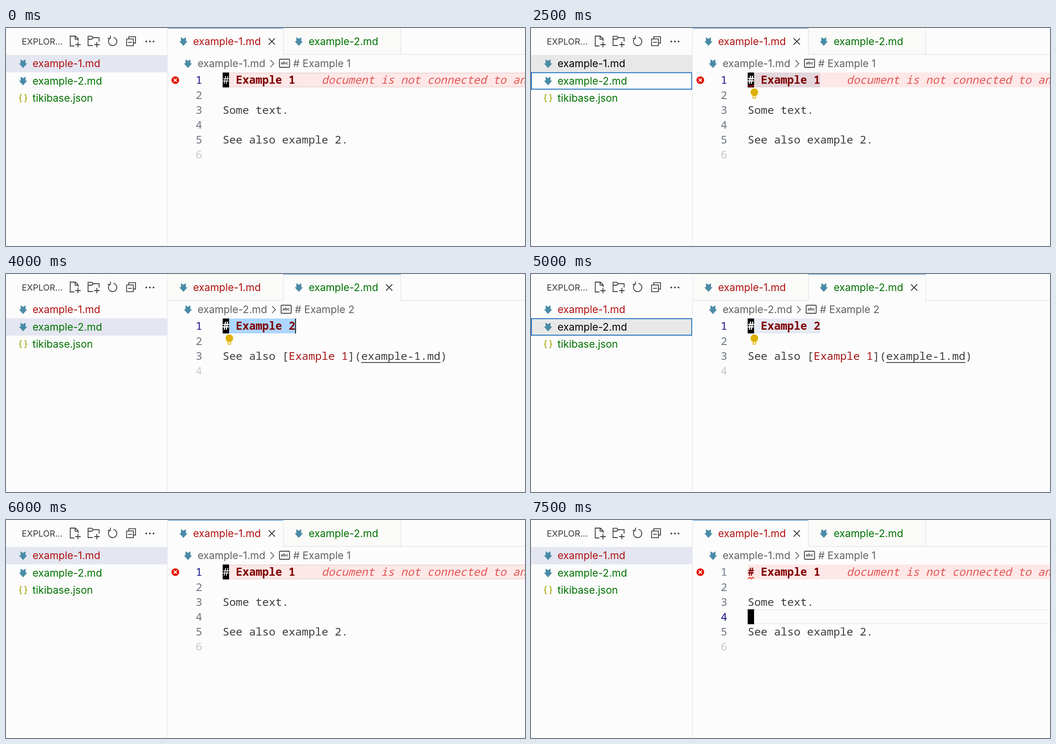
An HTML page for the animation above (8 s loop, 1154 by 485 pixels).

```html
<!DOCTYPE html>
<html lang="en">
<head>
<meta charset="utf-8">
<title>Editor walkthrough</title>
<style>
  html, body { margin: 0; width: 100%; height: 100%; overflow: hidden; background: #fcfcfc; }
  svg { display: block; width: 100%; height: 100%; }
  text { white-space: pre; }
  .ui { font: 22.75px Inter, sans-serif; }
  .code { font: 24.45px "Noto Sans Mono", monospace; }
  .bold { font-weight: 700; }
  .slant { font-style: italic; }
  .icon { fill: none; stroke: #3b3b3b; stroke-width: 1.8; }
</style>
</head>
<body>
<svg id="stage" viewBox="0 0 1154 485"></svg>
<script>
const LOOP = 8000;
const RED = '#b01011', GREEN = '#007100', INK = '#3b3b3b', HEAD = '#800000';
const LEFT = 481.8, CHAR = 14.67, TOP = 99, PITCH = 33.2;
const FILES = ['example-1.md', 'example-2.md', 'tikibase.json'];

// file: open tab; focus: sidebar row with the keyboard; select: heading selected; line: cursor line
const STEPS = [
  { at: 0, file: 0, line: 1 },
  { at: 1000, file: 0, line: 1, select: true },
  { at: 2000, file: 0, line: 1, select: true, focus: 0 },
  { at: 2500, file: 0, line: 1, select: true, focus: 1 },
  { at: 3000, file: 1, line: 1 },
  { at: 4000, file: 1, line: 1, select: true },
  { at: 5000, file: 1, line: 1, select: true, focus: 1 },
  { at: 5500, file: 1, line: 1, select: true, focus: 0 },
  { at: 6000, file: 0, line: 1 },
  { at: 6500, file: 0, line: 2 },
  { at: 7000, file: 0, line: 3 },
  { at: 7500, file: 0, line: 4 }
];

const rect = (x, y, w, h, fill, more = '') =>
  `<rect x="${x}" y="${y}" width="${w}" height="${h}" fill="${fill}" ${more}/>`;
const icon = (d, more = '') => `<path class="icon" d="${d}" ${more}/>`;
const label = (x, y, s, fill, more = '') =>
  `<text class="ui" x="${x}" y="${y}" fill="${fill}" ${more}>${s}</text>`;
const col = n => LEFT + n * CHAR;
const lineTop = n => TOP + (n - 1) * PITCH;
const baseline = n => 124.3 + (n - 1) * PITCH;
const code = (line, c, s, fill = INK, style = '') =>
  `<text class="code ${style}" x="${col(c)}" y="${baseline(line)}" fill="${fill}">${s}</text>`;
const arrow = (x, y) =>
  `<path transform="translate(${x} ${y})" fill="#498ba7"
    d="M-5.5-9.5L0-6L5.5-9.5V-.5H9.2L0 9.8L-9.2-.5H-5.5Z"/>`;

function toolbar() {
  return label(35, 36.5, 'EXPLOR...', INK, 'style="font-size:19.25px"') +
    icon('M152 40H142.8V18H154L160.6 24.5V29M153.6 18V24.8H160.6M160 31V43M154 37H166') +
    icon('M193 39H182.5V18.3H191L194 21.5H207V30M182.5 25H190.5L194 21.5M202 31V43M196 37H208') +
    icon('M226 23.2H232.2V17M231.2 22.7A9.3 9.3 0 1 0 239 20.8') +
    icon('M273 24V19.4H288V33.5H283.5M268.2 24.3H283.2V39.3H268.2ZM271.5 31.8H280') +
    [312, 320, 328].map(x => `<circle cx="${x}" cy="30" r="1.9" fill="${INK}"/>`).join('');
}

function sidebar({ file, focus }) {
  const active = focus !== undefined;
  const rowTop = i => 60 + i * 38.5;
  let out = toolbar() + rect(0, rowTop(file), 358.5, 38.5, active ? '#e8e8e8' : '#e4e6f1');
  if (active) {
    out += rect(.9, rowTop(focus) + .9, 356.5, 36.7, 'none', 'stroke="#005fb8" stroke-width="1.75"');
  }
  FILES.forEach((name, i) => {
    const colour = active && i === file ? '#000' : i ? GREEN : RED;
    out += label(59, 87.2 + i * 38.5, name, colour);
    if (i < 2) out += arrow(38, 79.2 + i * 38.5);
  });
  return out + icon('M35 148H34Q32 148 32 150.5V153.5Q32 156 29 156Q32 156 32 158.5V161.5Q32 164 34 164H35' +
    'M41 148H42Q44 148 44 150.5V153.5Q44 156 47 156Q44 156 44 158.5V161.5Q44 164 42 164H41',
    'style="stroke:#b7b73b;stroke-width:2.4"') + rect(358.3, 0, 1.2, 485, '#e5e5e5');
}

function tabs({ file }) {
  const edges = [359.5, 616.5, 877.5];
  const x0 = edges[file], x1 = edges[file + 1], other = 1 - file;
  const close = file ? 852 : 591;
  return rect(edges[other], 0, edges[other + 1] - edges[other], 59, '#fafaf8') +
    rect(359.5, 58.2, x0 - 359.5, 1.4, '#e5e5e5') +
    rect(x1, 58.2, 1154 - x1, 1.4, '#e5e5e5') +
    rect(616, 0, 1.4, 59, '#e5e5e5') + rect(877, 0, 1.4, 59, '#e5e5e5') +
    rect(x0, 0, x1 - x0, 1.3, '#5a97d0') +
    arrow(394.5, 30) + label(416, 38, FILES[0], RED) +
    arrow(651, 30) + label(673, 38, FILES[1], GREEN) +
    icon(`M${close - 7} 23L${close + 7} 37M${close + 7} 23L${close - 7} 37`);
}

function breadcrumb({ file }) {
  const dx = file * 3.7;
  return arrow(404.5, 79.2) + label(426, 87.2, FILES[file], '#616161') +
    `<g transform="translate(${dx} 0)">` +
    icon('M588 71.5L595.5 79.2L588 87', 'style="stroke:#616161"') +
    icon('M610 69.5H628.5Q630.5 69.5 630.5 71.5V85.5Q630.5 87.5 628.5 87.5H610Q608 87.5 608 85.5V71.5Q608 69.5 610 69.5Z') +
    `<text class="code bold" x="619.3" y="81.3" text-anchor="middle" fill="${INK}" style="font-size:9.5px">abc</text>` +
    label(638.5, 87.2, `# Example ${file + 1}`, '#616161') + '</g>';
}

function numbers({ file, line }) {
  const count = file ? 4 : 6;
  let out = '';
  for (let n = 1; n <= count; n++) {
    const colour = n === line ? '#171184' : n === count ? '#c8c8c8' : '#6e7681';
    out += `<text class="code" x="429" y="${baseline(n)}" text-anchor="middle" fill="${colour}">${n}</text>`;
  }
  return out;
}

function lineBorder(line) {
  const y = lineTop(line);
  return rect(LEFT + 14, y + .5, 660, 1.6, 'rgba(0,0,0,.08)') +
    rect(LEFT + 14, y + PITCH - 2.1, 660, 1.6, 'rgba(0,0,0,.08)');
}

function bulb() {
  return `<path fill="#ddb100" d="M492.8 150.5A8.4 8.4 0 1 1 500.4 150.5V157H492.8Z"/>` +
    rect(494.5, 151.5, 4.2, 3.8, '#fcfcfc');
}

function body(file) {
  if (file) {
    return code(3, 0, 'See also [') + code(3, 10, 'Example 1', '#a31515') +
      code(3, 19, '](') + code(3, 21, 'example-1.md') + code(3, 33, ')') +
      rect(col(21), 196, CHAR * 12, 1.8, INK);
  }
  return code(3, 0, 'Some text.') + code(5, 0, 'See also example 2.');
}

function editor(s) {
  const { file, line, select } = s;
  const active = s.focus === undefined;
  const fills = active ? ['#b4c3e8', '#add6ff'] : ['#e3d7dc', '#e5eaf3'];
  let out = '';
  if (!file) {
    out += rect(LEFT, TOP, 673, PITCH, '#fde8e7') +
      '<circle cx="376.5" cy="116" r="8.6" fill="#e51400"/>' +
      icon('M373 112.5L380 119.5M380 112.5L373 119.5', 'style="stroke:#fff;stroke-width:2"');
  }
  if (select) out += rect(LEFT, TOP, CHAR * 11, PITCH, fills[file]);
  else out += lineBorder(line);

  out += numbers(s) + body(file) + code(1, 0, `# Example ${file + 1}`, HEAD, 'bold');
  if (!file) out += code(1, 15, 'document is not connected to any other document', '#e45454', 'slant');

  out += rect(LEFT, lineTop(line), 14.2, PITCH, '#000');
  if (line === 1) out += code(1, 0, '#', '#fff', select ? 'bold' : '');
  if (line === 3) out += code(3, 0, 'S', '#fff');
  if (!file && (select || line > 1)) {
    out += icon('M482.5 131L486 127.5L489.5 131L493 127.5L496 130.5', 'style="stroke:#e51400;stroke-width:1.6"');
  }
  if (select) {
    if (active) out += rect(col(11) - .3, TOP, 1.8, PITCH, '#000');
    out += bulb();
  }
  return out;
}

const stage = document.getElementById('stage');
let shown;

function draw(now) {
  const t = now % LOOP;
  const step = STEPS.filter(s => s.at <= t).pop();
  if (step !== shown) {
    shown = step;
    stage.innerHTML = rect(0, 0, 1154, 485, '#fcfcfc') +
      sidebar(step) + tabs(step) + breadcrumb(step) + editor(step);
  }
}

const start = performance.now();
function tick() {
  draw(performance.now() - start);
  requestAnimationFrame(tick);
}
tick();
</script>
</body>
</html>
```
